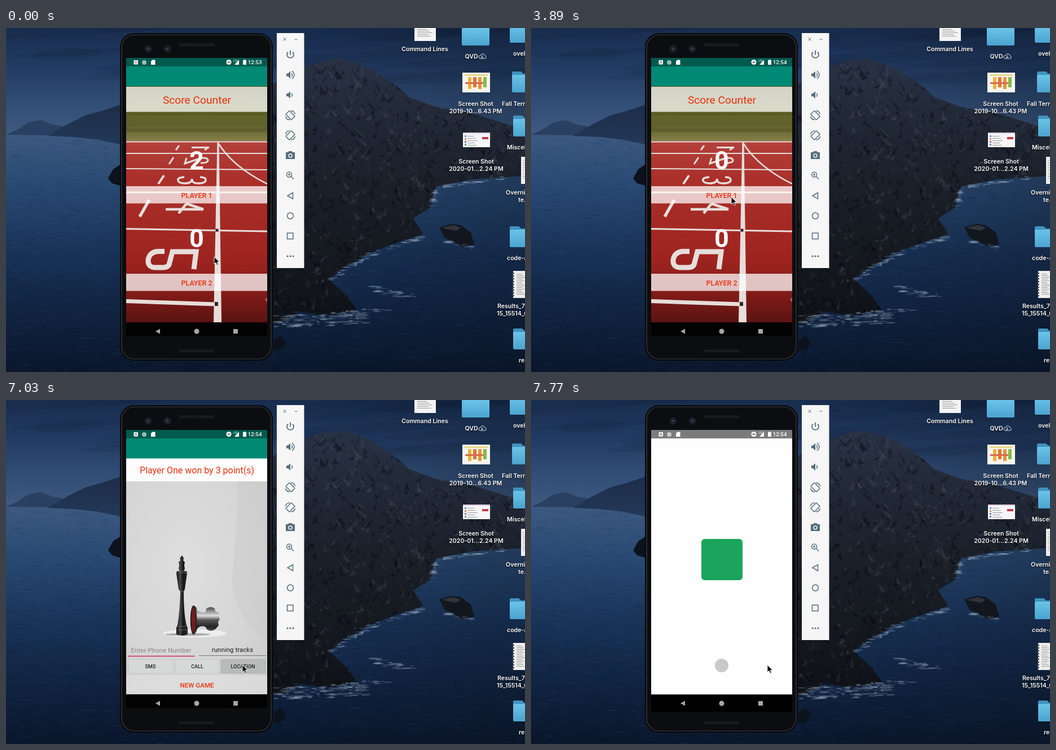
An HTML page with a canvas that plays this animation: 920x609 px, repeating every 8 s.

```html
<!DOCTYPE html>
<html lang="en">
<head>
<meta charset="utf-8">
<title>Score Counter</title>
<style>
html, body { margin: 0; width: 100%; height: 100%; overflow: hidden; background: #0d1c38; }
canvas, svg { position: absolute; left: 0; top: 0; width: 920px; height: 609px; }
svg { font-family: Roboto, sans-serif; }
.mid { text-anchor: middle; }
.med { font-weight: 500; }
.accent { fill: #ea310b; }
.score { font-size: 45px; font-weight: 700; fill: #fff; }
.label { font: 600 10.6px Inter, sans-serif; fill: #fff; text-shadow: 0 1px 2px #000; }
.tool { fill: none; stroke: #546e7a; stroke-width: 1.5; }
.tool .full { fill: #546e7a; stroke: none; }
.paint { fill: none; stroke: #e6deda; }
</style>
</head>
<body>
<canvas id="wall" width="920" height="609"></canvas>
<svg viewBox="0 0 920 609" xmlns="http://www.w3.org/2000/svg">
<defs>
  <linearGradient id="folder" x2="0" y2="1"><stop stop-color="#6cc3e8"/><stop offset="1" stop-color="#4ba3d0"/></linearGradient>
  <linearGradient id="grass" x2="0" y2="1"><stop stop-color="#4c4b1f"/><stop offset=".35" stop-color="#686a2b"/><stop offset=".7" stop-color="#5f602a"/><stop offset="1" stop-color="#85804a"/></linearGradient>
  <linearGradient id="clay" x2="0" y2="1"><stop stop-color="#b3413b"/><stop offset=".2" stop-color="#ab302b"/><stop offset=".65" stop-color="#9f2420"/><stop offset=".85" stop-color="#7f1b18"/><stop offset="1" stop-color="#5b1412"/></linearGradient>
  <radialGradient id="studio" cx=".42" cy=".4" r=".8"><stop stop-color="#dedede"/><stop offset=".6" stop-color="#d6d6d6"/><stop offset="1" stop-color="#cacaca"/></radialGradient>
  <linearGradient id="steel" x2="0" y2="1"><stop stop-color="#333"/><stop offset=".35" stop-color="#ddd"/><stop offset=".5" stop-color="#555"/><stop offset=".75" stop-color="#222"/><stop offset="1" stop-color="#888"/></linearGradient>
  <linearGradient id="ebony"><stop stop-color="#111"/><stop offset=".35" stop-color="#4a4a4a"/><stop offset=".6" stop-color="#161616"/><stop offset="1" stop-color="#2c2c2c"/></linearGradient>
  <pattern id="grille" width="3" height="3" patternUnits="userSpaceOnUse"><circle cx="1.5" cy="1.5" r=".9" fill="#34363a"/></pattern>
  <clipPath id="glass"><rect x="213" y="53" width="250" height="499"/></clipPath>
  <clipPath id="clip1"><rect x="213" y="280" width="250" height="30"/></clipPath>
  <clipPath id="clip2"><rect x="213" y="435" width="250" height="30"/></clipPath>
  <clipPath id="clip3"><rect x="381" y="459" width="79" height="25" rx="1"/></clipPath>
</defs>

<g id="desktop"></g>

<!-- handset -->
<rect x="202" y="9" width="271" height="580" rx="25" fill="#08090b"/>
<rect x="205" y="12" width="265" height="574" rx="22.5" fill="#0c0d10" stroke="#3f4146" stroke-width="1.2"/>
<g fill="#1c1d27" stroke="#2c2d38"><circle cx="252" cy="37" r="5.5"/><circle cx="286" cy="37" r="5.5"/></g>
<g fill="#3d4057"><circle cx="252" cy="37" r="2"/><circle cx="286" cy="37" r="2"/></g>
<rect x="307" y="27" width="62" height="5" fill="url(#grille)"/>
<rect x="307" y="569" width="62" height="5" fill="url(#grille)"/>

<g clip-path="url(#glass)">
  <rect x="213" y="53" width="250" height="492" fill="#020202"/>

  <g id="game">
    <path fill="#005a4d" d="M213 53h250v15H213z"/><path fill="#008975" d="M213 68h250v36H213z"/>
    <path fill="url(#grass)" d="M213 103h250v98H213z"/>
    <path fill="#3f421b" opacity=".3" d="M213 148h250v7H213zM213 178h250v6H213z"/>
    <path fill="url(#clay)" d="M213 200h250v321H213z"/>
    <g class="paint">
      <path stroke-width="2" d="M213 201.5H463M213 222H463M213 249L463 251"/>
      <path stroke-width="3" d="M213 291H463M213 355.5L463 360"/>
      <path stroke-width="7" d="M213 483.5L372 489"/>
      <path stroke-width="2.5" d="M377 205Q403 246 463 276"/>
      <path stroke-width="3" d="M307 208l-6 8M297 229l-8 12"/>
      <path stroke-width="4" d="M280 261l-10 15"/><path stroke-width="5.5" d="M254 304l-17 30"/>
      <path stroke-width="3" d="M329 211.500h31M352 216l6-4M320 230l-3 10L343 231q14-3 15 3 0 5-13 5"/>
      <path stroke-width="3.500" d="M316 264q-13 1-11 6 1 5 12 5 12 0 13-8-1 8 10 8 14 0 14-6 0-5-10-5"/>
      <path stroke-width="4.500" d="M283 321H350M320 311L350 321M320 311L306 328"/>
      <path stroke-width="9" d="M281 395.500h-13q-14 2-16 15-1 13 12 13.500h14q11 0 12-9L295 396H337L333 427"/>
    </g>
    <path fill="#e6deda" d="M374.5 201h3L382 521h-14z"/>
    <path fill="#392421" d="M371.500 355.500h5v5h-5zM370 485h6v7h-6z"/>
    <path class="paint" d="M463 478l-3 3 3 3"/>
    <path fill="#fff" opacity=".75" d="M213 104h250v44.500H213z"/>
    <path fill="#fff" opacity=".74" d="M213 280h250v30.500H213zM213 435h250v30.500H213z"/>
    <circle id="ripple1" clip-path="url(#clip1)" cx="356" cy="295"/>
    <circle id="ripple2" clip-path="url(#clip2)" cx="354" cy="455"/>
    <g class="mid">
      <text class="accent" x="338.500" y="133.500" font-size="19.200">Score Counter</text>
      <text id="score1" class="score" x="338" y="249.500"></text>
      <text id="score2" class="score" x="338" y="388"></text>
      <g class="accent med" font-size="12.500"><text x="338" y="300.500">PLAYER 1</text><text x="338" y="455.500">PLAYER 2</text></g>
    </g>
  </g>

  <g id="win">
    <path fill="#005a4d" d="M213 51h250v17H213z"/><path fill="#008975" d="M213 68h250v36H213z"/>
    <path fill="#fefefe" d="M213 103.500h250v40.500H213z"/><path fill="url(#studio)" d="M213 144h250v377H213z"/>
    <path fill="#cbcbcb" opacity=".5" d="M411 144h52v283q-54-35-63-105 9-90 11-178z"/>
    <ellipse cx="334" cy="413" rx="56" ry="7" fill="#ededed"/>
    <ellipse cx="322" cy="415" rx="40" ry="2.500" fill="#aaa"/>
    <path fill="url(#ebony)" d="M312 275l3 5-1 4 3 3-1 5 1 7-2 4h5l1 4-4 28-2 4q0 40 5 60l2 4v12q-10 4-20 0v-12l2-4q4-23 5-60l-3-4-4-28 1-4h5l-2-4 1-7-1-5 3-3-1-4z"/>
    <path stroke="#777" opacity=".8" d="M306 303h13M304 306h16M308 339h8M305 401h15M304 407h17"/>
    <path fill="url(#steel)" d="M331 364q8 1 8 9 10 5 15 2l1-6q8-5 15 0l1 5 7 3-1 6 2 5-3 5 1 6-6 7q-8 5-15 0l-2-4q-9-4-15 3-1 8-8 10z"/>
    <ellipse cx="332.500" cy="389.500" rx="5" ry="25" fill="#6d1d1d" stroke="#1b1b1b" stroke-width="1.500"/>
    <path fill="#e2e2e2" opacity=".65" d="M213 487h250v34H213z"/>
    <g fill="#d7d8d8" stroke="#c0c1c1" stroke-width=".8"><rect x="217" y="459" width="79" height="25" rx="1"/><rect x="300" y="459" width="78" height="25" rx="1"/><rect x="381" y="459" width="79" height="25" rx="1"/></g>
    <circle id="ripple3" clip-path="url(#clip3)" cx="420" cy="470"/>
    <path stroke="#d0246a" stroke-width="1.600" d="M216 453.500H335"/><path stroke="#747474" d="M342 452.500H461"/>
    <text x="221.500" y="447" font-size="11.600" fill="#858585">Enter Phone Number</text>
    <path id="caret" stroke="#d0246a" stroke-width="1.600" d="M276 434.500V451"/>
    <g class="mid">
      <text class="accent" x="338.500" y="130.300" font-size="16">Player One won by 3 point(s)</text>
      <text x="401.500" y="446" font-size="11.600" fill="#1d1d1d">running tracks</text>
      <g class="med" font-size="9" fill="#202020"><text x="256" y="474.700">SMS</text><text x="339" y="474.700">CALL</text><text x="420" y="474.700">LOCATION</text></g>
      <text class="accent med" x="338.500" y="509" font-size="11.600">NEW GAME</text>
    </g>
    <rect id="dim" x="212" y="50" width="252" height="472"/>
  </g>

  <g id="splash">
    <path fill="#fefefe" d="M213 53h250v468.500H213z"/><path fill="#7b7b7b" d="M213 53h250v15H213z"/>
    <path d="M213 521.500h250V552H213z"/>
    <g id="marks"><rect x="302" y="246" width="73" height="73" rx="6" fill="#1ca45c"/><circle cx="338" cy="470" r="12" fill="#c9c9c9"/></g>
  </g>

  <g fill="#fff">
    <rect x="226.500" y="57" width="7.500" height="7.500" rx="1"/>
    <path fill="none" stroke="#444" stroke-width=".9" d="M228.500 63l1.800-4.500 1.800 4.500"/>
    <circle cx="245" cy="61" r="4" opacity=".6"/><path d="M259.500 56.500h5v8.500h-7.500v-6z"/>
    <circle cx="395" cy="60.500" r="4.500"/><path stroke="#333" stroke-width="1.500" d="M392.500 60.500h5"/>
    <path d="M413 56v9h-8z"/><text x="403" y="59.500" font-size="4.500">LTE</text>
    <path d="M421.500 56h3v1h1.500v8h-6v-8h1.500z"/>
    <text id="clock" class="med" x="453.500" y="64" font-size="9.800" text-anchor="end"></text>
  </g>
  <g fill="#a6a6a6"><path d="M265 537l8-4.500v9z"/><circle cx="338" cy="537" r="4.500"/><path d="M403 533h8v8h-8z"/></g>
</g>

<!-- emulator controls -->
<rect x="480" y="9" width="48.500" height="416" fill="#f6f6f6"/>
<g class="tool">
  <path stroke-width="1" d="M491.500 17.500l5 5m0-5l-5 5M511.500 20h5"/>
  <path stroke-width="1.800" d="M500 42.500a6 6 0 1 0 8 0M504 39.500v8"/>
  <g id="speaker"><path class="full" d="M497 80.500h3l4-4v13l-4-4h-3z"/><path d="M506 80q3 3 0 6"/></g>
  <path d="M507 76q8 7 0 14"/>
  <use href="#speaker" y="35.500"/>
  <g id="turn"><rect x="-4.500" y="-7" width="9" height="14" rx="1" transform="translate(504 154.500) rotate(-45)"/><path d="M505 146.500q6 0 7.500 6M503 162.500q-6 0-7.500-6"/></g>
  <use href="#turn" transform="matrix(-1 0 0 1 1008 35.500)"/>
  <path class="full" d="M496 220h4l1.500-2h5l1.500 2h4v12h-16z"/><circle cx="504" cy="226" r="3" stroke="#f6f6f6"/>
  <circle cx="502" cy="259.500" r="4.500"/><path d="M505.500 263l4.500 4.500M500 259.500h4M502 257.500v4"/>
  <path d="M499 297l9.500-5.500v11z"/><circle cx="504" cy="332.500" r="5.500"/><path d="M498.500 363h10.500v10.500h-10.500z"/>
  <g class="full"><circle cx="499" cy="404" r="1.600"/><circle cx="504" cy="404" r="1.600"/><circle cx="509" cy="404" r="1.600"/></g>
</g>
<path id="cursor" d="M0 0V13L3 10.200 5 15 7.300 14 5.300 9.500H9.300Z" stroke="#fff" stroke-width=".9"/>
</svg>
<script>
const $ = id => document.getElementById(id);
const clamp = v => Math.max(0, Math.min(1, v));
const ramp = (t, a, b) => clamp((t - a) / (b - a));
let seed = 7;
const rnd = () => (seed = (seed * 16807) % 2147483647) / 2147483647;

function paintWall() {
  const c = $('wall').getContext('2d');
  const shade = (x0, y0, x1, y1, ...cols) => {
    const g = c.createLinearGradient(x0, y0, x1, y1);
    cols.forEach((col, i) => g.addColorStop(i / (cols.length - 1), col));
    return g;
  };
  const poly = (d, fill) => {
    const p = new Path2D('M' + d + 'Z');
    c.fillStyle = fill;
    c.fill(p);
    return p;
  };
  const box = (x, y, w, h, fill) => { c.fillStyle = fill; c.fillRect(x, y, w, h); };

  box(0, 0, 920, 195, shade(0, 0, 0, 195, '#182d4e', '#213a61', '#314d75', '#415b81'));
  for (let i = 0; i < 26; i++) {
    c.fillStyle = `rgba(12,24,46,${.05 + rnd() * .08})`;
    c.beginPath();
    c.ellipse(rnd() * 920, rnd() * 95, 60 + rnd() * 110, 3 + rnd() * 8, -.06, 0, 7);
    c.fill();
  }
  box(0, 189, 920, 420, shade(0, 189, 0, 609, '#3b5980', '#27466f', '#183257', '#102340', '#0a162b'));
  for (let i = 0; i < 2400; i++) {
    const y = 195 + rnd() * 414;
    box(rnd() * 920, y, 4 + rnd() * 16, 1, rnd() < .5 ? 'rgba(95,130,170,.11)' : 'rgba(3,12,28,.18)');
  }
  box(480, 0, 440, 609, shade(480, 0, 920, 0, 'rgba(10,18,32,0)', 'rgba(10,18,32,.3)'));

  poly('0 189L18 181 40 167 62 163 82 171 100 174 118 178 84 190', '#2a4062');
  poly('74 191L110 170 140 155 172 146 202 136V206L165 198 120 193', shade(0, 135, 0, 206, '#1c2d4a', '#233857'));
  poly('202 242L190 250 181 266 188 275 202 279', '#0c121e');

  const land = poly('465 104L500 82 530 68 560 59 590 54 620 61 650 74 680 94 700 108 714 122 760 139 830 152 ' +
    '920 180V262L825 268 762 281 752 318 722 337 740 365 684 383 642 400 600 425 572 444 606 476 622 500 ' +
    '565 509 520 502 490 520 465 524', shade(0, 54, 0, 510, '#293245', '#1e2531', '#171b22', '#0f1319'));
  c.save();
  c.clip(land);
  for (let i = 0; i < 1900; i++) {
    const x = 460 + rnd() * 460, y = 55 + rnd() * 465, lean = rnd() * 2 - .7, h = 3 + rnd() * 15;
    c.fillStyle = rnd() < .42 ? `rgba(88,90,98,${rnd() * .3})` : `rgba(4,7,14,${rnd() * .45})`;
    c.beginPath();
    c.moveTo(x, y);
    c.lineTo(x + h * lean, y + h);
    c.lineTo(x + h * lean - 2 - rnd() * 9, y + h * (.7 + rnd() * .6));
    c.fill();
  }
  c.restore();
  poly('768 353L790 347 806 349 824 362 830 383 808 388 794 378 778 372', '#12161d');
  poly('772 354L792 349 806 353 798 359', '#30343d');
  poly('474 553L486 545 497 557 488 570 474 572', '#0d131d');

  const surf = (x0, y0, x1, y1, n, spread) => {
    for (let i = 0; i < n; i++) {
      const k = rnd();
      c.fillStyle = `rgba(155,172,192,${.1 + rnd() * .38})`;
      c.beginPath();
      c.ellipse(x0 + (x1 - x0) * k, y0 + (y1 - y0) * k + (rnd() - .5) * spread, 2 + rnd() * 8, .5 + rnd() * 1.2, 0, 0, 7);
      c.fill();
    }
  };
  surf(478, 520, 640, 512, 130, 24);
  surf(600, 505, 680, 498, 18, 9);
  surf(575, 446, 640, 404, 28, 8);
  surf(640, 402, 742, 369, 36, 8);
  surf(755, 316, 762, 284, 16, 6);
  surf(765, 283, 890, 264, 24, 5);
  surf(772, 376, 830, 390, 18, 5);
  surf(650, 462, 725, 478, 24, 12);
}

function buildDesktop() {
  const rect = (x, y, w, h, fill) => `<rect x="${x}" y="${y}" width="${w}" height="${h}" fill="${fill}"/>`;
  const label = (x, y, s, mid) => `<text class="label${mid ? ' mid' : ''}" x="${x}" y="${y}">${s}</text>`;
  const folder = (x, y) => `<path fill="#3f93bf" d="M${x} ${y + 2}q0-2 2-2h14l4 4h27q2 0 2 2v8h-49z"/>` +
    `<rect x="${x}" y="${y + 6}" width="49" height="31" rx="2" fill="url(#folder)"/>`;
  const lines = (x, y, w, n, gap) => Array.from({ length: n }, (_, i) =>
    rect(x, y + i * gap, w * (.65 + .35 * ((i * 7) % 5) / 4), 1, '#9a9a9a')).join('');
  let s = rect(724, 0, 38, 23, '#f4f4f4') + lines(729, 2, 27, 5, 3) + label(742.5, 41, 'Command Lines', 1);
  s += folder(808, -6) + label(825, 54, 'QVD', 1);
  s += '<path fill="none" stroke="#d5dbe4" d="M840 54q-3-1-2-4 2-2 3-1 1-4 5-3 3 1 3 3 3 1 2 4l-2 1zM844 48v5m-2-2l2 2 2-2"/>';
  s += rect(809, 79, 49, 35, '#f7f5ef') + rect(813, 82, 41, 3, '#e7d98e');
  for (let i = 0; i < 4; i++)
    s += rect(819 + i * 9, 87, 6, 21 - i % 2 * 3, ['#e7b53a', '#e2743a', '#e0973c', '#86b94a'][i]);
  s += rect(814, 96, 32, 3, '#d96a4e') + label(832.5, 138, 'Screen Shot', 1) + label(832.5, 151, '2019-10...6.43 PM', 1);
  s += rect(810, 185, 48, 26, '#f6f6f8') + rect(810, 185, 48, 2, '#d8c8dc') + rect(844, 193, 11, 4, '#c43a4c') + lines(818, 191, 18, 5, 4);
  for (let i = 0; i < 4; i++) s += rect(813, 190 + i * 5, 3, 3, ['#6a8fd0', '#d08a5a', '#7f6ab0', '#5a9a80'][i]);
  s += label(833.5, 240, 'Screen Shot', 1) + label(833.5, 253, '2020-01...2.24 PM', 1);
  s += folder(893, -11) + label(899, 49, 'ovel');
  s += folder(897, 77) + label(879, 138, 'Fall Term');
  s += folder(899, 155) + label(888, 215, 'Miscel');
  s += rect(913, 228, 7, 48, '#efefef') + lines(916, 234, 4, 9, 4) + label(886, 295, 'Overnig') + label(908, 308, 'te.');
  s += folder(893, 351) + label(888, 411, 'code-a');
  s += rect(899, 430, 21, 48, '#eeeeec') + lines(905, 435, 15, 13, 3);
  for (let i = 0; i < 9; i++) s += rect(897, 433 + i * 5, 4, 2, '#3b3f46');
  s += label(871, 496, 'Results_76') + label(870, 509, '15_15514_6');
  s += folder(899, 532) + label(909, 592, 'rep');
  $('desktop').innerHTML = s;
}

// Bursts of screen updates: first, last, count
const bursts = [[150, 1050, 7], [1200, 1950, 6], [2250, 2400, 2], [2850, 3000, 2], [3440, 3590, 2],
  [3890, 4330, 4], [4630, 5530, 7], [5680, 5980, 3], [6580, 7480, 7], [7630, 7770, 2]];
const ticks = [0];
for (const [a, b, n] of bursts)
  for (let i = 0; i < n; i++) ticks.push(Math.round((a + (b - a) * i / (n - 1)) / 10) * 10);

const route = [[0, 369, 405], [150, 367, 418], [450, 354, 455], [1050, 354, 456], [1200, 355, 380], [1350, 356, 293],
  [2400, 356, 293], [3000, 355, 299], [4480, 355, 299], [5530, 415, 476], [5980, 419, 469], [8000, 419, 469]];
function pointer(t) {
  const i = Math.max(1, route.findIndex(p => p[0] >= t));
  const [a, x0, y0] = route[i - 1], [b, x1, y1] = route[i];
  const k = ramp(t, a, b);
  return [x0 + (x1 - x0) * k, y0 + (y1 - y0) * k];
}

function ripple(id, t, presses, hold) {
  const start = presses.filter(p => p <= t).pop();
  const age = start === undefined ? Infinity : t - start;
  $(id).setAttribute('r', age < hold ? 30 + age * .6 : 0);
  $(id).setAttribute('opacity', .14 * (1 - ramp(age, hold * .6, hold)));
}

const show = (id, on) => { $(id).style.display = on ? '' : 'none'; };

function draw(t) {
  $('score1').textContent = t < 1650 ? 2 : t < 2400 ? 3 : t < 3590 ? 4 : 0;
  $('score2').textContent = t < 600 ? 0 : t < 1050 ? 1 : t < 3590 ? 2 : 0;
  $('clock').textContent = t < 2850 ? '12:53' : '12:54';
  ripple('ripple1', t, [1500, 2250, 3440], 420);
  ripple('ripple2', t, [450, 900], 420);
  ripple('ripple3', t, [6580], 1400);

  show('game', t < 4330);
  show('win', t >= 4040 && t < 7630);
  const rise = t < 4330 ? 14 * Math.pow(1 / 7, (t - 4040) / 150) : 0;
  const s = Math.max(.9, 1 - .064 * Math.max(0, t - 7030) / 150);
  $('win').setAttribute('transform', `matrix(${s} 0 0 ${s} ${338 * (1 - s)} ${340 * (1 - s) + rise})`);
  $('dim').setAttribute('opacity', .42 * ramp(t, 7030, 7180));
  show('caret', t < 7030 && Math.floor((t - 3980) / 500) % 2 === 0);

  show('splash', t > 7180);
  $('splash').setAttribute('opacity', ramp(t, 7180, 7480));
  $('marks').setAttribute('opacity', ramp(t, 7330, 7630));
  $('cursor').setAttribute('transform', `translate(${pointer(t)})`);
}

paintWall();
buildDesktop();
let last = -1;
function loop() {
  const now = performance.now() % 8000;
  const t = ticks.filter(v => v <= now).pop();
  if (t !== last) draw(last = t);
  requestAnimationFrame(loop);
}
loop();
</script>
</body>
</html>
```
